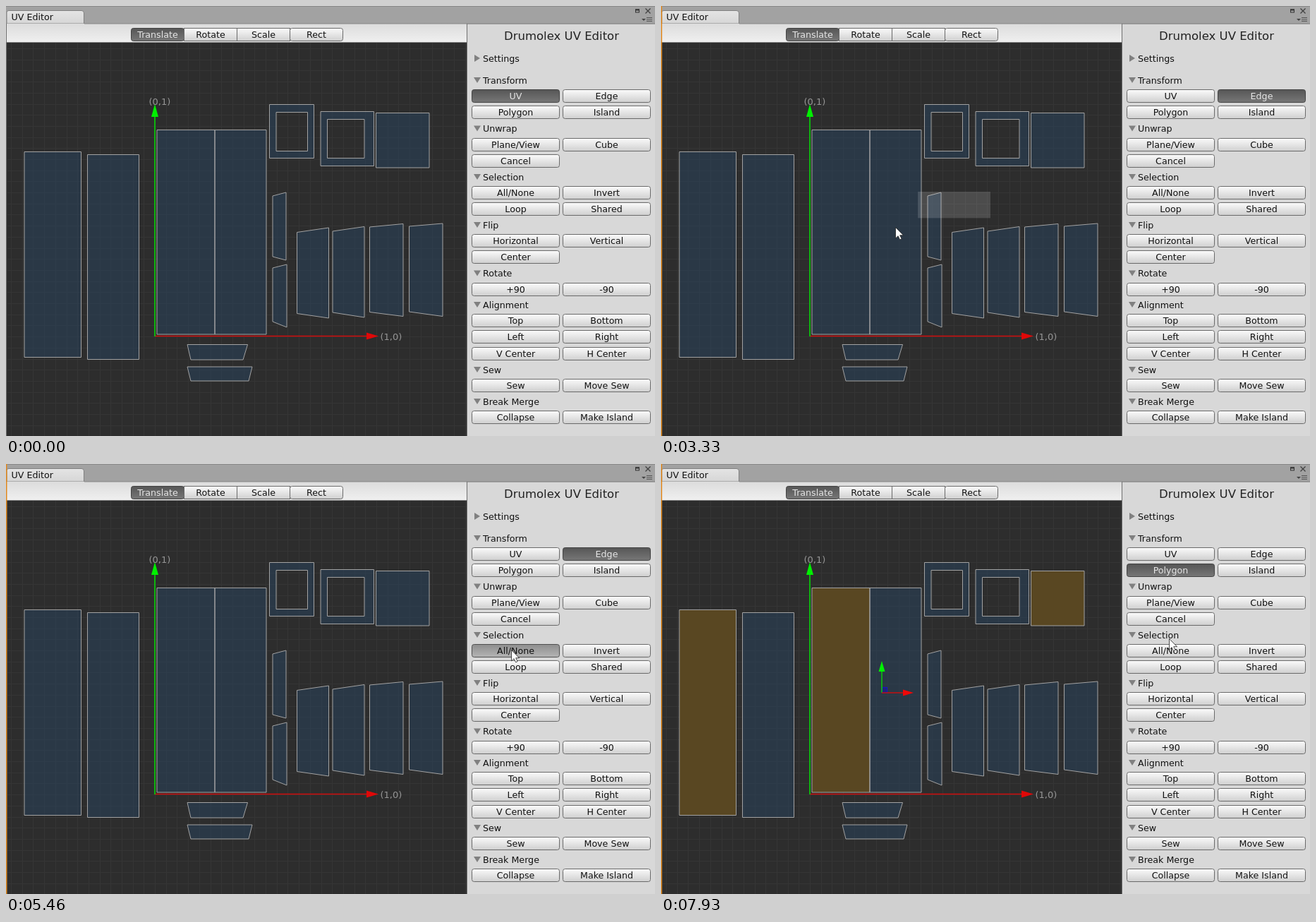
Write an HTML page that moves like this. It is 920x609 px and loops after 7.99 s.

```html
<!DOCTYPE html>
<html lang="en">
<head>
<meta charset="utf-8">
<title>UV Editor</title>
<style>
  html, body { margin: 0; width: 100%; height: 100%; overflow: hidden; background: #2d2d2d; }
  svg { display: block; width: 920px; height: 609px; }
  text { font: 12.65px "DejaVu Sans", Verdana, sans-serif; fill: #111; }
  .mid { text-anchor: middle; }
  .title { font-size: 16.5px; fill: #222; }
  .coord { font-size: 13px; fill: #959595; }
  .btn rect { fill: url(#up); stroke: #6a6a6a; }
  .btn.down rect { fill: url(#down); stroke: #505050; }
  .btn.on rect { fill: url(#on); stroke: #444; }
  .btn.on text { fill: #e6e6e6; }
  .poly { fill: rgba(41, 69, 96, .5); }
  .poly.sel { fill: #594722; }
  .edge { stroke: #a2a2a2; }
  .edge.sel { stroke: #f0a01c; }
  .vert { fill: #ffa510; visibility: hidden; }
  .vert.sel { visibility: visible; }
</style>
</head>
<body>
<svg id="stage" viewBox="0 0 920 609">
  <defs>
    <linearGradient id="up" x2="0" y2="1"><stop stop-color="#fbfbfb"/><stop offset="1" stop-color="#cfcfcf"/></linearGradient>
    <linearGradient id="down" x2="0" y2="1"><stop stop-color="#8e8e8e"/><stop offset="1" stop-color="#b4b4b4"/></linearGradient>
    <linearGradient id="on" x2="0" y2="1"><stop stop-color="#565656"/><stop offset="1" stop-color="#777"/></linearGradient>
    <linearGradient id="tab" x2="0" y2="1"><stop stop-color="#e4e4e4"/><stop offset="1" stop-color="#d6d6d6"/></linearGradient>
    <linearGradient id="bar" x2="0" y2="1"><stop stop-color="#dcdcdc"/><stop offset="1" stop-color="#f0f0f0"/></linearGradient>
  </defs>
  <rect width="920" height="609" fill="#2d2d2d"/>
  <path id="grid" stroke="#353535" fill="none"/>
  <g id="axes">
    <path d="M211 467.5H512" stroke="#d00c0c" stroke-width="1.4"/>
    <path d="M511 462.5L528 467.5L511 472.5Z" fill="#e00808"/>
    <path d="M211 468V156" stroke="#06d606" stroke-width="1.6"/>
    <path d="M206 157L211 139L216 157Z" fill="#00f000"/>
    <text class="coord" x="202.5" y="140">(0,1)</text>
    <text class="coord" x="530.5" y="473">(1,0)</text>
  </g>
  <g id="polys"></g>
  <g id="edges" fill="none"></g>
  <g id="verts"></g>
  <g id="gizmo">
    <rect x=".5" y="-7.5" width="7" height="7" fill="#1818a0" fill-opacity=".6" stroke="#1414c8"/>
    <path d="M0 0V-31" stroke="#06d606" stroke-width="1.4"/>
    <path d="M-4.5 -30L0 -45L4.5 -30Z" fill="#00f000"/>
    <path d="M0 0H31" stroke="#d00c0c" stroke-width="1.4"/>
    <path d="M30 -4.5L45 0L30 4.5Z" fill="#f00808"/>
  </g>
  <rect id="band" fill="#fff" fill-opacity=".15"/>

  <rect width="920" height="25" fill="#a2a2a2"/>
  <path d="M0 .5H920" stroke="#8a8a8a"/>
  <path d="M1 25V9Q1 6.5 4 6.5H107Q110.5 6.5 110.5 10V25Z" fill="url(#tab)" stroke="#808080"/>
  <text x="7.5" y="20">UV Editor</text>
  <rect x="1" y="25" width="652" height="27" fill="url(#bar)"/>
  <path d="M111 25H920M1 51.5H653" stroke="#858585"/>
  <rect x="654" y="25.5" width="266" height="584" fill="#d8d8d8"/>
  <path d="M653.5 25V609M.5 25V609" stroke="#707070"/>
  <rect x="892.5" y="5" width="5" height="4" fill="none" stroke="#333"/>
  <path d="M892 5.5H898" stroke="#333" stroke-width="2"/>
  <path d="M906.5 3.5L913.5 10.5M913.5 3.5L906.5 10.5" stroke="#444" stroke-width="1.4"/>
  <path d="M901 18H907L904 21Z" fill="#444"/>
  <path d="M908 16.5H916M908 19H916M908 21.5H916" stroke="#555"/>
  <text class="title mid" x="787.5" y="48">Drumolex UV Editor</text>
  <g id="ui"></g>
  <path id="focus" d="M.75 0V609" stroke="#e08a22" stroke-width="1.5"/>
  <path id="cursor" d="M0 0V15.5L3.6 12.2L6.1 17.4L8.6 16.2L6.2 11.2H11Z" fill="#fff" stroke="#222" stroke-width=".8"/>
</svg>
<script>
const LOOP = 7990;
const $ = id => document.getElementById(id);

function add(parent, tag, attrs, text) {
  const el = document.createElementNS('http://www.w3.org/2000/svg', tag);
  for (const k in attrs) el.setAttribute(k, attrs[k]);
  if (text) el.textContent = text;
  return parent.appendChild(el);
}

// Panel
const buttons = {};
function button(label, x, y, w, h = 19, r = 3) {
  const g = add($('ui'), 'g', { class: 'btn' });
  add(g, 'rect', { x: x + .5, y: y + .5, width: w, height: h - 1, rx: r });
  add(g, 'text', { class: 'mid', x: x + w / 2 + .5, y: y + h / 2 + 4.7 }, label);
  return g;
}

['Translate', 'Rotate', 'Scale', 'Rect'].forEach((name, i) =>
  button(name, 177 + i * 75, 31, 75, 19, i % 3 ? 0 : 3).classList.toggle('on', !i));

const sections = [
  ['Settings', 74],
  ['Transform', 105, 'UV', 'Edge', 'Polygon', 'Island'],
  ['Unwrap', 173.5, 'Plane/View', 'Cube', 'Cancel'],
  ['Selection', 242, 'All/None', 'Invert', 'Loop', 'Shared'],
  ['Flip', 310, 'Horizontal', 'Vertical', 'Center'],
  ['Rotate', 378.5, '+90', '-90'],
  ['Alignment', 423, 'Top', 'Bottom', 'Left', 'Right', 'V Center', 'H Center'],
  ['Sew', 515, 'Sew', 'Move Sew'],
  ['Break Merge', 560, 'Collapse', 'Make Island'],
];
for (const [name, y, ...labels] of sections) {
  const tri = labels.length ? `M663 ${y - 4}H673L668 ${y + 4}Z` : `M664 ${y - 5}V${y + 5}L672 ${y}Z`;
  add($('ui'), 'path', { d: tri, fill: '#808080' });
  add($('ui'), 'text', { x: 676, y: y + 4.7 }, name);
  labels.forEach((label, i) => {
    const top = Math.round(y + 13 + (i >> 1) * 23.4);
    buttons[label] = button(label, i % 2 ? 789 : 660, top, 124);
  });
}

// Unwrapped shapes
let grid = '';
for (let x = 7; x < 653; x += 15.7) grid += `M${Math.round(x) + .5} 52V609`;
for (let y = 60; y < 609; y += 15.7) grid += `M2 ${Math.round(y) + .5}H653`;
$('grid').setAttribute('d', grid);

const box = (l, t, r, b) => [[l, t], [r, t], [r, b], [l, b]];
const side = (l, r, a, b, c, d) => [[l, a], [r, b], [r, c], [l, d]];
const trap = (t, b, x0, x1, x2, x3) => [[x0, t], [x1, t], [x2, b], [x3, b]];

// Each shape: edges in the partial selection (top, right, bottom, left), then its rings
const shapes = [
  ['rl', box(26, 206.5, 106.5, 497.5)],
  ['r', box(115.5, 210.5, 188.5, 500.5)],
  ['rbl', box(214, 175.5, 296, 465)],
  ['rb', box(296, 175.5, 369, 465)],
  ['l', box(373.5, 139.5, 436.5, 215.5), box(383, 150.5, 427.5, 205.5)],
  ['tr', box(446, 149.5, 521.5, 226.5), box(455.5, 160.5, 508, 215.5)],
  ['r', box(524.5, 151.5, 600, 229)],
  ['trbl', side(378, 397, 269, 264, 360, 355)],
  ['', side(378, 398, 371, 366, 455, 447)],
  ['trl', side(412.5, 457.5, 320.5, 314, 442, 435.5)],
  ['tbl', side(463, 508, 319, 312.5, 441, 434)],
  ['b', side(515.5, 563, 313, 308.5, 439.5, 433.5)],
  ['', side(571.5, 619, 312, 308, 439.5, 433)],
  ['r', trap(479.5, 501, 257, 342.5, 336, 262)],
  ['l', trap(511, 531, 257, 349, 344, 262)],
];
const polys = [], edges = [], verts = [];
for (const [part, ...rings] of shapes) {
  const d = rings.map(r => 'M' + r.join('L') + 'Z').join('');
  polys.push(add($('polys'), 'path', { class: 'poly', d, 'fill-rule': 'evenodd' }));
  rings.forEach((ring, n) => ring.forEach((p, i) => {
    const el = add($('edges'), 'path', { class: 'edge', d: `M${p}L${ring[(i + 1) % 4]}` });
    edges.push({ el, part: !n && part.includes('trbl'[i]) });
    const [x, y] = p;
    verts.push({
      el: add($('verts'), 'rect', { class: 'vert', x: x - 2.5, y: y - 2.5, width: 5.5, height: 5.5 }),
      part: x > 185 && x < 457 && y > 128 && y < 250,
    });
  }));
}
// Highlighted edges stay above plain neighbours
edges.filter(e => e.part).forEach(e => $('edges').append(e.el));

// State changes over time
const mid = [322, 335];
const none = { sel: 'none', at: null }, all = { sel: 'all', at: mid };
const press = { down: 'All/None' };
const log = [
  [0, { mode: 'UV', picked: [], down: '', focus: false, ...none }],
  [390, { focus: true }],
  [900, { sel: 'part', at: [322, 183] }],
  [1540, press], [1620, { down: '', ...none }],
  [1870, press], [1940, { down: '', ...all }],
  [2180, press], [2260, { down: '', ...none }],
  [2470, press], [2550, { down: '', ...all }],
  [2820, { down: 'Edge' }], [2890, { down: '', mode: 'Edge' }],
  [3170, none],
  [3530, { sel: 'part', at: [361, 320] }],
  [4540, press], [4610, { down: '', ...none }],
  [4810, press], [4900, { down: '', ...all }],
  [5100, press], [5170, { down: '', ...none }],
  [5410, press], [5490, { down: '', ...all }],
  [6240, { down: 'Polygon' }], [6320, { down: '', mode: 'Polygon' }],
  [6710, { sel: 'none', picked: [6], at: [562, 190] }],
  [7210, { picked: [6, 2], at: [407, 308] }],
  [7480, { picked: [6, 2, 0], at: [313, 324] }],
];

// Pointer path: time, x, y
const path = [
  [50, 839, 110], [390, 185, 128], [430, 185, 128], [770, 456, 249], [940, 456, 249],
  [1400, 702, 273], [1520, 709, 263], [2570, 709, 263], [2800, 848, 127], [2900, 848, 127],
  [3140, 467, 263], [3170, 467, 263], [3290, 365, 300], [3330, 333, 313], [3490, 202, 345],
  [3580, 202, 345], [4070, 709, 285], [4170, 709, 285], [4380, 716, 263], [5550, 716, 263],
  [5850, 812, 121], [6080, 740, 148], [6350, 735, 148], [6650, 565, 194], [6750, 565, 194],
  [7160, 255, 315], [7250, 255, 315], [7440, 102, 343], [7650, 102, 343], [7930, 720, 247],
];
function pointer(t) {
  const i = path.findIndex(p => p[0] > t);
  if (i < 0) return path[path.length - 1].slice(1);
  const [t0, x0, y0] = path[Math.max(0, i - 1)], [t1, x1, y1] = path[i];
  let k = t1 > t0 ? Math.max(0, (t - t0) / (t1 - t0)) : 0;
  if (t1 - t0 > 200) k = k * k * (3 - 2 * k);
  return [x0 + (x1 - x0) * k, y0 + (y1 - y0) * k];
}

const drags = [[430, 900, 185, 128], [3170, 3530, 467, 263]];
function drawBand(t) {
  const drag = drags.find(d => t >= d[0] && t < d[1]);
  $('band').style.display = drag ? '' : 'none';
  if (!drag) return;
  const [start, , x0, y0] = drag;
  const [x, y] = pointer(Math.max(start, t - 40));
  const attrs = { x: Math.min(x, x0), y: Math.min(y, y0), width: Math.abs(x - x0), height: Math.abs(y - y0) };
  for (const k in attrs) $('band').setAttribute(k, attrs[k]);
}

function mark(items, sel) {
  for (const { el, part } of items) el.classList.toggle('sel', sel === 'all' || (sel === 'part' && part));
}

function applyState(s) {
  for (const name of ['UV', 'Edge', 'Polygon', 'All/None']) {
    buttons[name].classList.toggle('on', s.mode === name);
    buttons[name].classList.toggle('down', s.down === name);
  }
  mark(verts, s.mode === 'UV' ? s.sel : 'none');
  mark(edges, s.mode === 'UV' ? 'none' : s.sel);
  polys.forEach((el, i) => el.classList.toggle('sel', s.picked.includes(i)));
  $('focus').style.display = s.focus ? '' : 'none';
  $('gizmo').style.display = s.at ? '' : 'none';
  if (s.at) $('gizmo').setAttribute('transform', `translate(${s.at})`);
}

let shown = -1;
function draw(t) {
  const past = log.filter(e => e[0] <= t);
  if (past.length !== shown) {
    shown = past.length;
    applyState(Object.assign({}, ...past.map(e => e[1])));
  }
  drawBand(t);
  $('cursor').style.display = t < 50 ? 'none' : '';
  $('cursor').setAttribute('transform', `translate(${pointer(t).map(v => Math.round(v) + .5)})`);
}

const begin = performance.now();
function tick() {
  draw((performance.now() - begin) % LOOP);
  requestAnimationFrame(tick);
}
tick();
</script>
</body>
</html>
```
